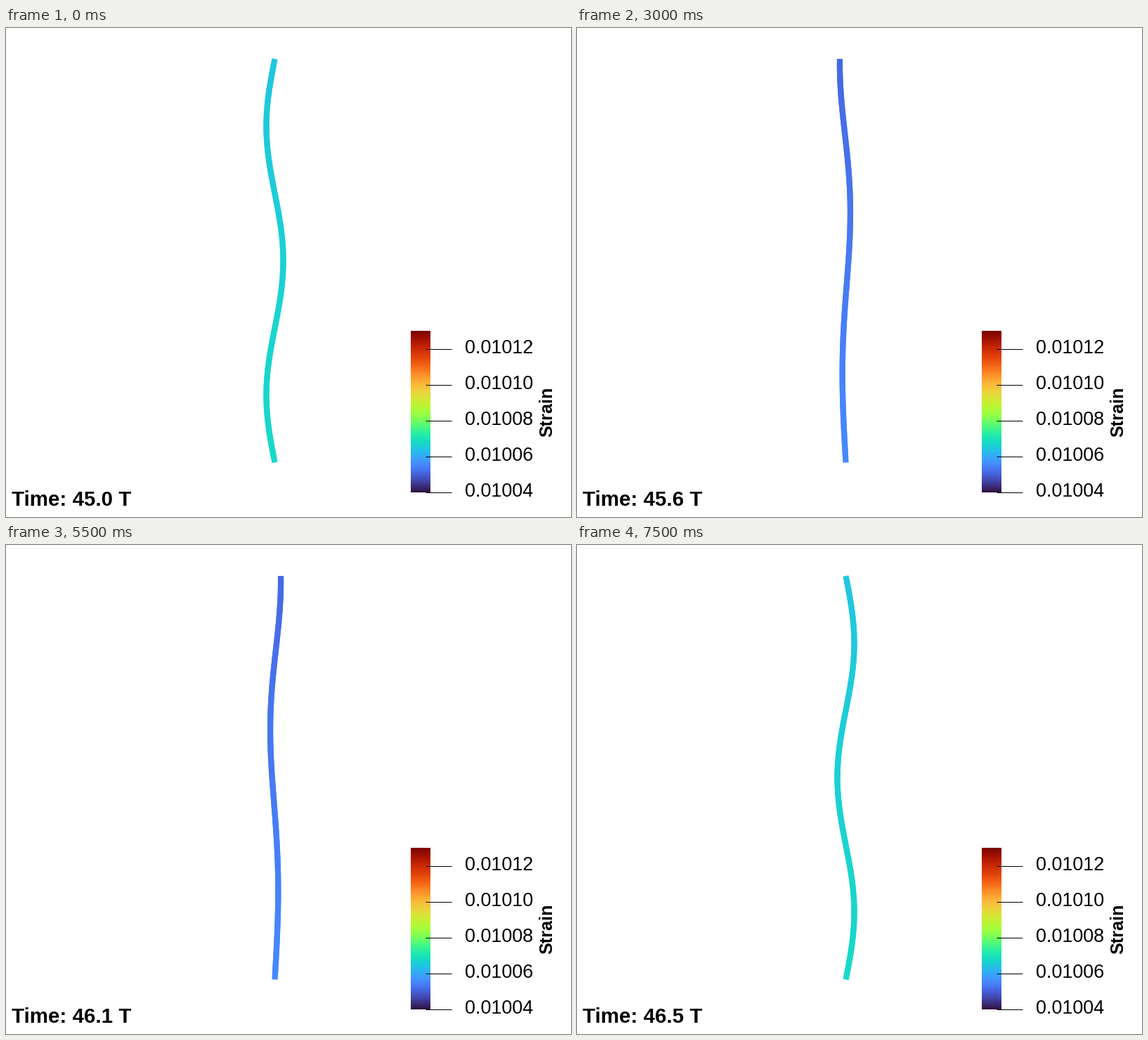
These frames come from a looping animation (804x696 px, 8 s). A matplotlib script:

```python
import numpy as np
import matplotlib.pyplot as plt
from matplotlib.animation import FuncAnimation
from matplotlib.collections import LineCollection

W, H, DPI = 804, 696, 96
PX = 72 / DPI                      # points per pixel
FRAMES, STEP_MS = 16, 500
START = 45.0

# string driven at the top, clamped at the bottom
X0, TOP, BOTTOM = 382.5, 44, 618.5
LENGTH = BOTTOM - TOP
DRIVE, PEAK, LAG = 14.5, 24.2, 12.0
K_IN = (3 * np.pi - np.arcsin(DRIVE / PEAK)) / LENGTH
K_OUT = 3 * np.pi / LENGTH

plt.rcParams["font.family"] = "Liberation Sans"
turbo = plt.get_cmap("turbo")

fig = plt.figure(figsize=(W / DPI, H / DPI), dpi=DPI, facecolor="white")
ax = fig.add_axes([0, 0, 1, 1])

# colour bar
ax.imshow(np.linspace(1, 0, 256)[:, None], cmap=turbo, aspect="auto",
          extent=(575.5, 603, 661, 431.5), interpolation="nearest")
ax.set_xlim(0, W)
ax.set_ylim(H, 0)
ax.axis("off")


def label(x, y, text, size, **kw):
    return ax.text(x, y, text, fontsize=size * PX, color="black",
                   va="baseline", **kw)


for i in range(5):
    y = 661 - 51 * i
    ax.plot([597, 634], [y - 0.5] * 2, color="black", lw=PX,
            solid_capstyle="butt")
    label(652.5, y + 6, f"{0.01004 + 0.00002 * i:.5f}", 27)

label(777, 581.5, "Strain", 25.2, weight="bold", rotation=90,
      rotation_mode="anchor")
clock = label(8.5, 680.5, "", 29.5, weight="bold")

s = np.linspace(0, LENGTH, 97)     # distance from the clamped end
rope = LineCollection([], linewidths=8.2 * PX, capstyle="butt")
ax.add_collection(rope, autolim=False)


def offset(t):
    a = 2 * np.pi * t
    return (PEAK * np.sin(K_IN * s) * np.sin(a)
            - LAG * np.sin(K_OUT * s) * np.cos(a))


def update(n):
    t = n / 10
    u = offset(t)
    pts = np.column_stack([X0 + u, BOTTOM - s])
    # overlapping pieces hide the seams
    rope.set_segments([pts[i:i + 3] for i in range(len(pts) - 2)])

    stretch = np.mean(np.gradient(u, s) ** 2) / 2
    level = 0.115 + 17.8 * stretch
    slope = np.clip(0.25 * (0.44 - level), -0.015, 0.05)
    rope.set_color(turbo(level + slope * (0.5 - s[1:-1] / LENGTH)))

    clock.set_text(f"Time: {START + t:.1f} T")
    return rope, clock


anim = FuncAnimation(fig, update, frames=FRAMES, interval=STEP_MS,
                     repeat=True, repeat_delay=0)
plt.show()
```
